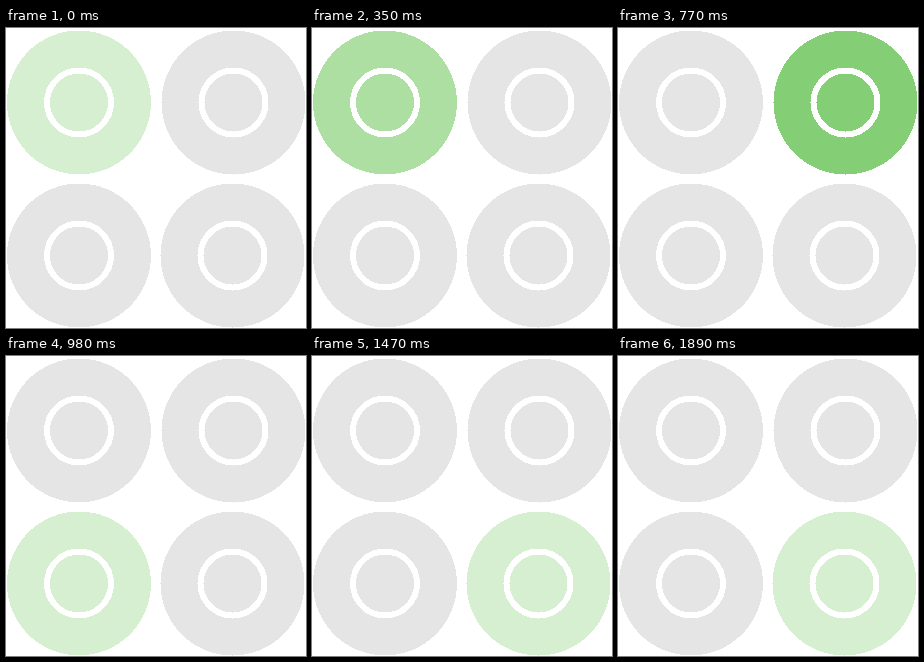
Recreate the animation shown at these times as an HTML page. Size 300x300 px, loop 1.96 s.

```html
<!DOCTYPE html>
<html lang="en">
<head>
<meta charset="utf-8">
<title>Four discs loader</title>
<style>
  html, body { margin: 0; width: 100%; height: 100%; overflow: hidden; background: #fff; }
  svg { display: block; width: 300px; height: 300px; shape-rendering: crispEdges; }
  .disc { --pale: #d6efd0; --soft: #addfa3; --mid: #84cf75; --full: #54bd43; }
  .disc circle:first-child {
    fill: #e5e5e5;
    animation: pulse 1960ms step-end infinite;
    animation-delay: calc(var(--i) * 490ms - 1960ms);
  }
  .ring { fill: none; stroke: #fff; stroke-width: 6; }

  /* Seven 70 ms steps, then idle while the other discs take their turn. */
  @keyframes pulse {
    0% { fill: var(--pale); }
    3.571% { fill: var(--soft); }
    7.142% { fill: var(--mid); }
    10.714% { fill: var(--full); }
    14.285% { fill: var(--mid); }
    17.857% { fill: var(--soft); }
    21.428% { fill: var(--pale); }
    25%, 100% { fill: #e5e5e5; }
  }
</style>
</head>
<body>
<svg viewBox="0 0 300 300">
  <g class="disc" style="--i:0" transform="translate(73 74.5)"><circle r="72"/><circle class="ring" r="32"/></g>
  <g class="disc" style="--i:1" transform="translate(227.5 74.5)"><circle r="72"/><circle class="ring" r="32"/></g>
  <g class="disc" style="--i:2" transform="translate(73 227.5)"><circle r="72"/><circle class="ring" r="32"/></g>
  <g class="disc" style="--i:3" transform="translate(226.5 227.5)"><circle r="72"/><circle class="ring" r="32"/></g>
</svg>
</body>
</html>
```
